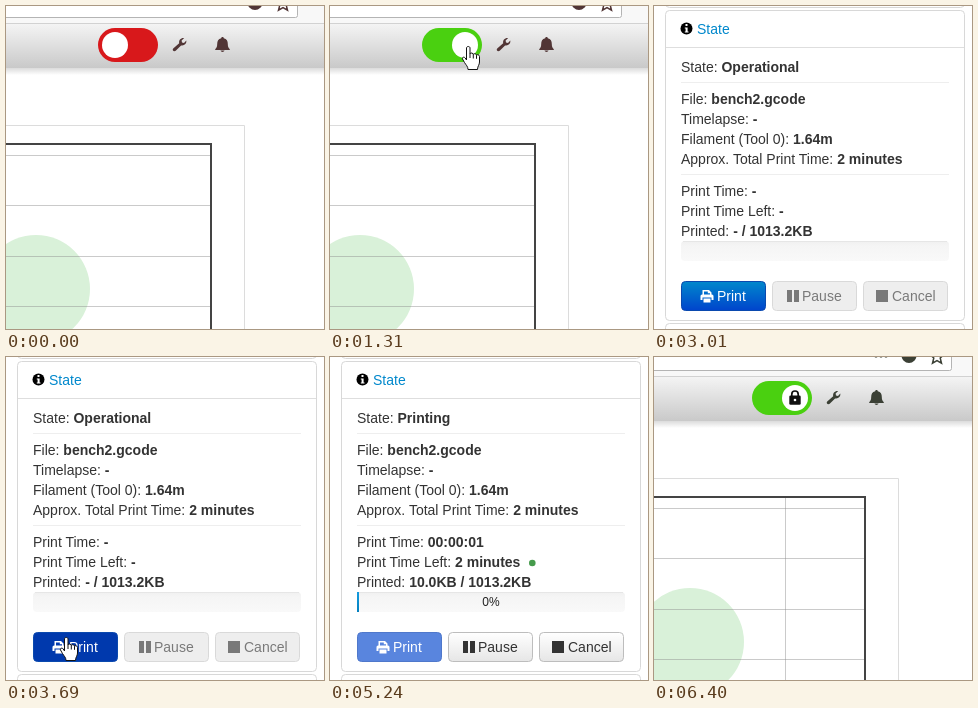
An HTML page for the animation above (7510 ms loop, 318 by 323 pixels).

```html
<!DOCTYPE html>
<html lang="en">
<head>
<meta charset="utf-8">
<title>Print toggle</title>
<style>
html, body { margin: 0; width: 100%; height: 100%; overflow: hidden; background: #fff; }
svg { display: block; width: 318px; height: 323px; }
text { font: 14px "Liberation Sans", Arial, sans-serif; fill: #333; white-space: pre; }
.b { font-weight: bold; }
.rule { stroke: #eee; }
.grid { stroke: #8a8a8a; stroke-opacity: .45; }
.box { fill: #fff; stroke: #d8d8d8; }
</style>
</head>
<body>
<svg viewBox="0 0 318 323">
  <defs>
    <linearGradient id="bar" x2="0" y2="1"><stop stop-color="#f4f4f4"/><stop offset="1" stop-color="#c9c9c9"/></linearGradient>
    <linearGradient id="shade" x2="0" y2="1"><stop stop-opacity=".14"/><stop offset="1" stop-opacity="0"/></linearGradient>
    <linearGradient id="blue" x2="0" y2="1"><stop stop-color="#08c"/><stop offset="1" stop-color="#04c"/></linearGradient>
    <linearGradient id="grey" x2="0" y2="1"><stop stop-color="#fff"/><stop offset="1" stop-color="#e6e6e6"/></linearGradient>
    <linearGradient id="track" x2="0" y2="1"><stop stop-color="#f0f0f0"/><stop offset=".25" stop-color="#f5f5f5"/><stop offset="1" stop-color="#f9f9f9"/></linearGradient>
    <linearGradient id="fill" x2="0" y2="1"><stop stop-color="#149bdf"/><stop offset="1" stop-color="#0480be"/></linearGradient>
  </defs>

  <g id="page">
    <rect x="-20" y="-20" width="360" height="38" fill="#f8f8f8"/>
    <rect x="-20" y="-20" width="311.5" height="31.5" rx="2" fill="#fff" stroke="#b4b4b4"/>
    <path d="M-20 17.5H340" stroke="#d2d2d2"/>
    <rect x="-20" y="18" width="360" height="44" fill="url(#bar)"/>
    <rect x="-20" y="62" width="360" height="7" fill="url(#shade)"/>
    <g id="icons">
      <circle cx="216" cy="-3" r="1.6"/><circle cx="221" cy="-3" r="1.6"/><circle cx="226" cy="-3" r="1.6"/>
      <circle cx="249" cy="-3.5" r="7.5"/>
      <path d="M277-9.5l2 4.6 5 .5-3.8 3.4 1.3 5.2-4.5-2.6-4.5 2.6 1.3-5.2-3.8-3.4 5-.5z" fill="#fff" stroke="currentColor" stroke-width="1.5"/>
      <path d="M167.2 42.6l6-5.4c-.6-3 1.6-5.6 5-5.2l-2.6 2.6.4 2 2 .4 2.3-2.4c.5 3-2.2 5.6-5.2 4.8l-5.4 5.4c-1.8 1.4-4-.6-2.5-2.2z"/>
      <path d="M216.500 31c.9 0 1.300.6 1.300 1.300 3 .7 4 3 4 5.700 0 3 .8 4 2 5.200v.8h-14.600v-.8c1.200-1.200 2-2.200 2-5.200 0-2.700 1-5 4-5.700 0-.7.4-1.300 1.300-1.300zM214.500 44.600h4c-.4 1.900-3.600 1.900-4 0z"/>
    </g>
    <rect id="pill" x="92" y="22" width="60" height="34" rx="17"/>
    <circle id="knob" cy="39" r="13" fill="#fff"/>
    <g id="lock">
      <path d="M131.800 38v-2.800a3.200 3.200 0 0 1 6.400 0V38" fill="none" stroke="#111" stroke-width="1.700"/>
      <rect x="129.300" y="36.500" width="11.400" height="9.300" rx="1.300" fill="#111"/>
      <circle cx="135" cy="41" r="1.300" fill="#fff"/>
    </g>
    <path d="M-20 119.500H238.500V340" fill="none" stroke="#dcdcdc"/>
    <circle cx="30" cy="283" r="54" fill="#d9f1d9"/>
    <path class="grid" d="M-20 149.500H204M-20 199.500H204M-20 250.500H204M-20 300.500H204"/>
    <path id="column" class="grid" d="M125.500 139V340"/>
    <path d="M-20 138H205V340" fill="none" stroke="#444" stroke-width="2"/>
  </g>

  <g id="panel">
    <rect class="box" x="11.500" y="-20.500" width="299" height="22" rx="4"/>
    <rect class="box" x="11.500" y="4.500" width="299" height="310" rx="4"/>
    <rect class="box" x="11.500" y="317.500" width="299" height="30" rx="4"/>
    <path d="M12 41.500H310" stroke="#dedede"/>
    <circle cx="32.500" cy="22.500" r="6" fill="#000"/>
    <path d="M31.500 18h2v2h-2zM30.800 21.400h2.800v4h.9v1.200h-3.700v-1.200h.8v-2.800h-.8z" fill="#fff"/>
    <text x="43" y="28" style="fill:#08c">State</text>
    <path class="rule" d="M27 76.500H295M27 168.500H295"/>
    <g id="rows"></g>
    <circle id="dot" cx="202.300" cy="206" r="3.300" fill="#469b4c"/>
    <rect x="27" y="235" width="268" height="20" rx="4" fill="url(#track)"/>
    <path d="M29 235.500H293" stroke="#e6e6e6"/>
    <rect id="done" x="27" y="235" height="20" fill="url(#fill)"/>
    <text id="percent" x="161" y="249" text-anchor="middle" style="font-size:12px;fill:#222">0%</text>
    <rect id="print" x="27.500" y="275.500" width="84" height="29" rx="4"/>
    <g fill="#fff">
      <path d="M48.500 289v-5h6.500l2.500 2.500v2.500h-1.500v-1.800h-2.200v-1.800h-3.800v3.600z"/>
      <path d="M46.500 294v-4q0-1.600 1.600-1.600h9.800q1.600 0 1.600 1.600v4h-2v-2.500h-9v2.500zM49.500 292.500h7v4h-7z"/>
      <text x="63" y="295" style="fill:#fff">Print</text>
    </g>
    <g class="side">
      <rect x="118.500" y="275.500" width="84" height="29" rx="4"/>
      <path d="M133 284h5v12h-5zM140 284h5v12h-5z" fill="#333"/>
      <text x="148" y="295">Pause</text>
    </g>
    <g class="side">
      <rect x="209.500" y="275.500" width="84" height="29" rx="4"/>
      <path d="M222 284h12v12h-12z" fill="#333"/>
      <text x="238" y="295">Cancel</text>
    </g>
  </g>

  <g id="cursor" stroke-linejoin="round">
    <path id="arrow" d="M.500.500V16.500L4.200 13 6.700 18.500 9.200 17.400 6.800 12H11.700z" fill="#fff" stroke="#111"/>
    <g id="hand">
      <path d="M-1.500 14V2C-1.500 0 2 0 2 2V8C2 6.500 5.300 6.700 5.300 8.500 5.300 7.200 8.500 7.500 8.500 9.300 8.500 8.300 11.500 8.500 11.500 10.500V16C11.500 19 9.500 20 9.500 23.500H0C0 20.500-2 19-3.500 16.500L-5.500 13C-6.200 11.300-4 10.500-2.800 12z" fill="#fff" stroke="#111"/>
      <path d="M2 8v4M5.300 8.500v4M8.500 9.300v3.500" stroke="#111"/>
    </g>
  </g>
</svg>
<script>
const LOOP = 7510;
const $ = id => document.getElementById(id);
const set = (el, attrs) => { for (const k in attrs) el.setAttribute(k, attrs[k]); };
const show = (el, on) => { el.style.display = on ? "" : "none"; };
const clamp = v => Math.min(1, Math.max(0, v));
const lerp = (a, b, p) => a + (b - a) * p;
const smooth = p => p * p * (3 - 2 * p);
const easeOut = p => 1 - (1 - p) ** 2;
const linear = p => p;

// Progress in n equal jumps; the first lands at a, the last at b.
const stepped = (t, a, b, n) =>
  t < a ? 0 : clamp((Math.floor((t - a) / (b - a) * (n - 1) + 0.02) + 1) / n);

const rows = [
  ["State: ", 66], ["File: ", 98], ["Timelapse: ", 118], ["Filament (Tool 0): ", 138],
  ["Approx. Total Print Time: ", 158], ["Print Time: ", 190], ["Print Time Left: ", 210], ["Printed: ", 230]
].map(([label, y]) => {
  const ns = "http://www.w3.org/2000/svg";
  const line = document.createElementNS(ns, "text");
  const value = document.createElementNS(ns, "tspan");
  set(line, { x: 27, y });
  set(value, { class: "b" });
  line.append(label, value);
  $("rows").append(line);
  return value;
});

// start, end, jumps, from, to, easing, time the pointer stays until
const moves = [
  [150, 770, 9, [222, 318], [138, 40], smooth, 1387],
  [1387, 1620, 4, [138, 40], [154, 66], smooth, 1700],
  [1700, 2080, 6, [154, 66], [298, 340], linear, 2080],
  [3220, 3540, 5, [80, 326], [60, 280], easeOut, 4000],
  [4000, 4001, 1, [58, 279], [58, 279], linear, 4150],
  [4150, 4230, 2, [58, 279], [66, 330], linear, 4230]
];

function pointer(t) {
  const m = moves.find(m => t >= m[0] && t < m[6]);
  if (!m) return null;
  const [a, b, n, from, to, ease] = m;
  const p = ease(stepped(t, a, b, n));
  return [lerp(from[0], to[0], p), lerp(from[1], to[1], p)];
}

function drawPage(t) {
  const late = t >= 5320;
  const on = smooth(stepped(t, 920, 1309, 6));
  const mix = [[216, 74], [24, 208], [27, 16]].map(([a, b]) => Math.round(lerp(a, b, on)));
  const ink = late ? "#3b4035" : "#513535";
  set($("page"), { transform: late ? "translate(6 2)" : "" });
  set($("icons"), { fill: ink, color: ink });
  set($("pill"), { fill: `rgb(${mix})` });
  set($("knob"), { cx: lerp(109, 135, on) });
  show($("lock"), t >= 5870);
  show($("column"), t >= 6400);
}

function drawPanel(t, over) {
  const busy = t >= 4000;
  const sent = !busy ? "-" : t < 4460 ? "8.0KB" : t < 5000 ? "9.2KB" : "10.0KB";
  [
    busy ? "Printing" : "Operational", "bench2.gcode", "-", "1.64m", "2 minutes",
    t < 5000 ? "-" : "00:00:01", busy ? "2 minutes" : "-", sent + " / 1013.2KB"
  ].forEach((s, i) => { rows[i].textContent = s; });
  show($("dot"), busy);
  show($("percent"), busy);
  set($("done"), { width: t < 4460 ? 0 : t < 4540 ? 1 : 2 });

  const pressed = t >= 3690 && t < 3830;
  set($("print"), {
    fill: busy ? "#5985de" : pressed ? "#0039ad" : over ? "#04c" : "url(#blue)",
    stroke: !busy ? "#0a49ae" : t < 4230 ? "#7f8eae" : "#4f78cb"
  });
  document.querySelectorAll(".side").forEach(g => {
    set(g.querySelector("rect"), {
      fill: busy ? "url(#grey)" : "#e6e6e6",
      stroke: busy ? "#bdbdbd" : "#c6c6c6"
    });
    set(g, { opacity: busy ? 1 : 0.65 });
  });
}

function draw(t) {
  const inPanel = t >= 3010 && t < 5320;
  const at = pointer(t);
  const over = !!at && (inPanel ? t < 4000 && at[1] < 304 : at[1] < 56);
  show($("page"), !inPanel);
  show($("panel"), inPanel);
  if (inPanel) drawPanel(t, over); else drawPage(t);
  show($("cursor"), at);
  if (at) {
    set($("cursor"), { transform: `translate(${at.map(Math.round)})` });
    show($("hand"), over);
    show($("arrow"), !over);
  }
}

const start = performance.now();
function tick(now) {
  draw(Math.max(0, now - start) % LOOP);
  requestAnimationFrame(tick);
}
draw(0);
requestAnimationFrame(tick);
</script>
</body>
</html>
```
